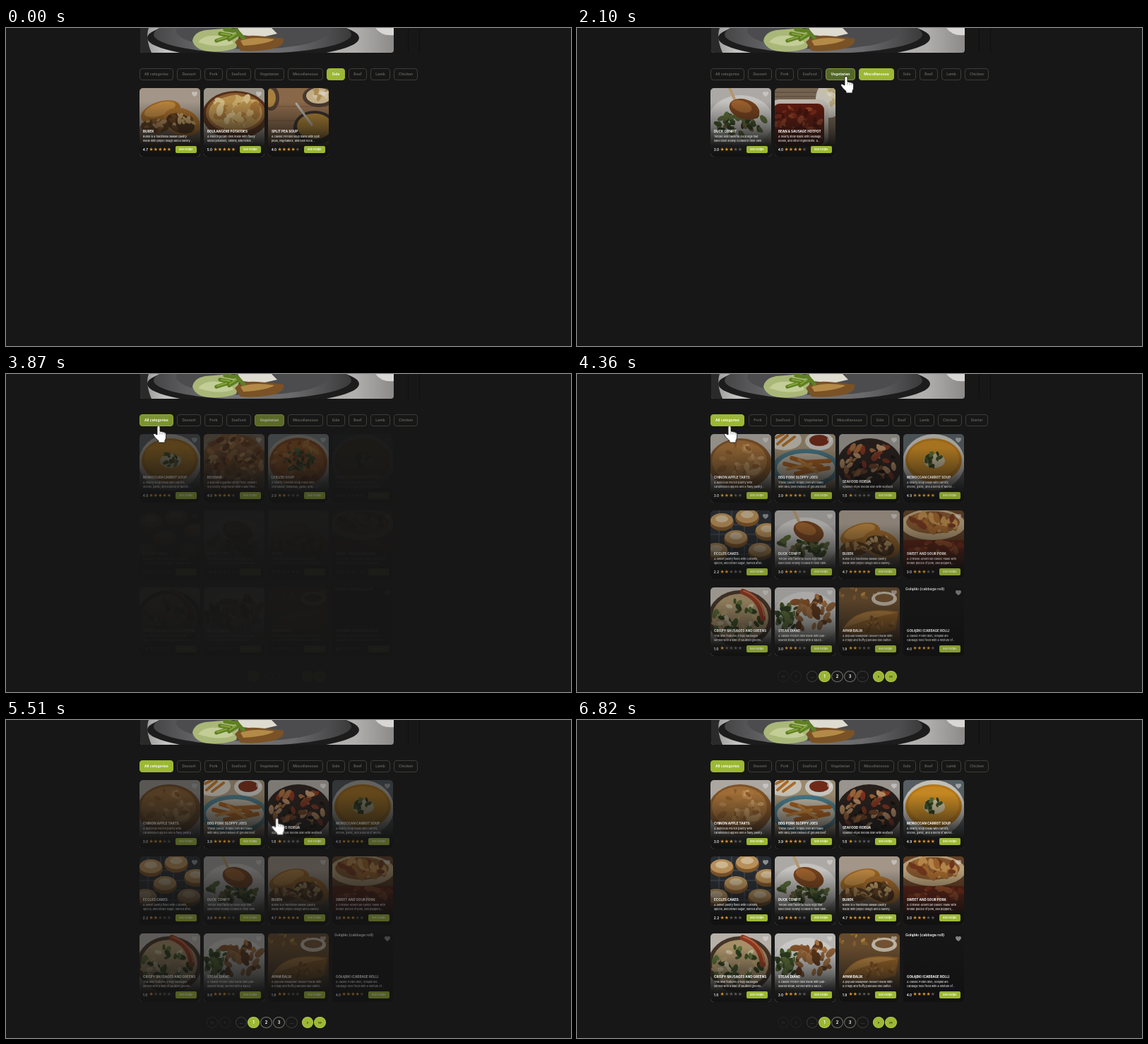
An HTML page that plays this animation: 800 by 450 pixels, repeating every 7.09 s.

```html
<!DOCTYPE html>
<html lang="en">
<head>
<meta charset="utf-8">
<title>Recipe categories</title>
<style>
:root { --bg: #171717; --green: #9cb834; --olive: #54672a; --line: #3d3d39; --mute: #64645e; }
html, body { margin: 0; width: 100%; height: 100%; overflow: hidden; background: var(--bg); }
#stage { position: relative; width: 800px; height: 450px; overflow: hidden; background: var(--bg); color: #fff; font-family: Inter, Roboto, sans-serif; }
#stage * { box-sizing: border-box; }
.hero { position: absolute; left: 190px; top: 0; border-radius: 0 0 4px 4px; }
.edge { position: absolute; left: 569px; top: 0; width: 17px; height: 35px; border: solid #0f0f0f; border-width: 0 1px; }

/* category bar */
.bar { position: absolute; left: 189px; top: 57px; width: 393.5px; height: 17px; overflow: hidden; }
.rest { position: absolute; left: 53px; top: 0; display: flex; gap: 5px; animation: shift 7090ms step-end infinite; }
.chip { flex: none; height: 17px; border: 1px solid var(--line); border-radius: 4px; color: var(--mute); font: 600 5.1px/15px Inter, Roboto, sans-serif; text-align: center; white-space: nowrap; animation: 7090ms ease-out infinite; }
.all { position: absolute; left: 0; z-index: 1; animation-name: all; }
.dessert { animation-name: dessert; }
.vegetarian { animation-name: vegetarian; }
.miscellaneous { animation-name: miscellaneous; }
.side { animation-name: side; }
@keyframes shift { 0%, 65.2% { transform: none; } 54.9% { transform: translateX(-38px); } }
@keyframes side {
  0%, 15.3% { background: var(--green); border-color: var(--green); color: #fff; }
  17.4%, 100% { background: var(--bg); border-color: var(--line); color: var(--mute); }
}
@keyframes miscellaneous {
  0%, 10.4%, 35.4%, 100% { background: var(--bg); border-color: var(--line); color: var(--mute); }
  12.4%, 15.3% { background: var(--olive); border-color: var(--green); color: #fff; }
  17.4%, 33.2% { background: var(--green); border-color: var(--green); color: #fff; }
}
@keyframes vegetarian {
  0%, 27.2%, 56%, 100% { background: var(--bg); border-color: var(--line); color: var(--mute); }
  29.3%, 33.2% { background: var(--olive); border-color: #84983a; color: #fff; }
  35.4%, 53.9% { background: var(--green); border-color: var(--green); color: #fff; }
}
@keyframes dessert {
  0%, 42.4%, 49.4%, 100% { background: var(--bg); border-color: var(--line); color: var(--mute); opacity: 1; }
  44.4%, 47.4% { background: var(--olive); border-color: #84983a; color: #fff; }
  54.89%, 65.2% { opacity: 1; }
  54.9%, 65.19% { opacity: 0; }
}
@keyframes all {
  0%, 47.4% { background: var(--bg); border-color: var(--line); color: var(--mute); }
  49.9%, 53.9% { background: var(--olive); border-color: #84983a; color: #fff; }
  55.7%, 100% { background: var(--green); border-color: var(--green); color: #fff; }
}

/* recipe cards */
.set { position: absolute; left: 189px; top: 85px; animation: 7090ms linear infinite; }
.set.s0 { animation-name: show-side; }
.set.s1 { animation-name: show-misc; }
.set.s2 { animation-name: show-veg; }
.set.s3, .pages { animation-name: show-all; }
@keyframes show-side { 0%, 15.3% { opacity: 1; } 18.5%, 100% { opacity: 0; } }
@keyframes show-misc { 0%, 15.8% { opacity: 0; } 22%, 33.9% { opacity: 1; } 36.3%, 100% { opacity: 0; } }
@keyframes show-veg { 0%, 34.6% { opacity: 0; } 44%, 53.9% { opacity: 1; } 55%, 100% { opacity: 0; } }
@keyframes show-all { 0%, 54.3% { opacity: 0; } 63%, 100% { opacity: 1; } }

.card { position: absolute; width: 86.4px; height: 97px; border-radius: 5px; overflow: hidden; background: #111; }
.card > svg { position: absolute; left: 0; top: 0; }
.card .shade { position: absolute; inset: 0; background: linear-gradient(rgba(17,17,17,.1) 20%, rgba(17,17,17,.55) 58%, rgba(17,17,17,.94) 84%, #111); }
.card .heart { left: 73.5px; top: 4.5px; opacity: .55; }
.card .alt { position: absolute; left: 3px; top: -1px; font: 600 5.2px/7px Inter, sans-serif; white-space: nowrap; }
.text { position: absolute; left: 5px; bottom: 19.3px; white-space: nowrap; }
.text b { display: block; font: 700 4.6px/8px Inter, sans-serif; text-transform: uppercase; }
.text p { margin: 0; font: 500 3.75px/6px Inter, sans-serif; color: #e2e2e2; }
.rate { position: absolute; left: 4.8px; top: 83px; font: 600 4.7px/9px Inter, sans-serif; }
.stars { position: absolute; left: 13.6px; top: 82.5px; color: #d9952b; font: 7px/9px "DejaVu Sans", sans-serif; white-space: nowrap; }
.stars i { color: #5b5b58; font-style: normal; }
.see { position: absolute; left: 51px; top: 82px; width: 29.5px; height: 10px; border-radius: 2px; background: var(--green); font: 600 3.8px/10px Inter, sans-serif; text-align: center; }

.s3 .card { animation: dim 7090ms ease-out infinite; }
.s3 .card:nth-child(1) { animation-name: hover1; }
.s3 .card:nth-child(2) { animation-name: hover2; }
.s3 .card:nth-child(3) { animation-name: hover3; }
.s3 .card:nth-child(4) { animation-name: hover4; }
@keyframes dim { 0%, 64.3% { opacity: 1; } 67.7%, 89.5% { opacity: .45; } 96.2%, 100% { opacity: 1; } }
@keyframes hover1 {
  0%, 64.3% { opacity: 1; filter: brightness(1); }
  66.5%, 70.2% { opacity: 1; filter: brightness(1.15); }
  73.3%, 89.5% { opacity: .45; filter: brightness(1); }
  96.2%, 100% { opacity: 1; filter: brightness(1); }
}
@keyframes hover2 {
  0%, 64.3% { opacity: 1; filter: brightness(1); }
  67.7%, 70.2% { opacity: .45; filter: brightness(1); }
  73%, 76.5% { opacity: 1; filter: brightness(1.15); }
  79.5%, 89.5% { opacity: .45; filter: brightness(1); }
  96.2%, 100% { opacity: 1; filter: brightness(1); }
}
@keyframes hover3 {
  0%, 64.3% { opacity: 1; filter: brightness(1); }
  67.7%, 76.8% { opacity: .45; filter: brightness(1); }
  79.5%, 82% { opacity: 1; filter: brightness(1.15); }
  85%, 89.5% { opacity: .45; filter: brightness(1); }
  96.2%, 100% { opacity: 1; filter: brightness(1); }
}
@keyframes hover4 {
  0%, 64.3% { opacity: 1; filter: brightness(1); }
  67.7%, 82.2% { opacity: .45; filter: brightness(1); }
  85%, 88.5% { opacity: 1; filter: brightness(1.15); }
  92%, 100% { opacity: 1; filter: brightness(1); }
}

/* pagination */
.pages { position: absolute; left: 0; top: 420px; animation-duration: 7090ms; animation-iteration-count: infinite; }
.pages span { position: absolute; width: 16.4px; height: 16px; margin-left: -8.2px; border: 1px solid #232323; border-radius: 50%; color: #3a3a3a; font: 700 5.6px/14px Inter, sans-serif; text-align: center; }
.pages .dots { border-color: #3a3a37; color: #777; }
.pages .num { border-color: #74746e; color: #fff; }
.pages .on { border-color: #b4cb50; background: var(--green); color: #fff; }
.pages .next { border-color: #b4cb50; background: var(--green); color: #14160c; }

.cursor { position: absolute; left: -8px; top: 0; animation: move 7090ms ease-in-out infinite, seen 7090ms step-end infinite; }
@keyframes seen { 0% { opacity: 0; } .98% { opacity: 1; } 95.1% { opacity: 0; } }
@keyframes move {
  0%, .99% { transform: translate(712px, 397px); animation-timing-function: ease-out; }
  10.4%, 24.7% { transform: translate(425px, 66px); }
  28.9%, 36.25% { transform: translate(381px, 68px); }
  42.1% { transform: translate(268px, 72px); }
  46.9% { transform: translate(266px, 72px); }
  49.9%, 63.3% { transform: translate(216px, 73px); animation-timing-function: ease-in; }
  66.3% { transform: translate(232px, 122px); animation-timing-function: linear; }
  70.1% { transform: translate(304px, 132px); animation-timing-function: linear; }
  74.9% { transform: translate(345px, 137px); animation-timing-function: linear; }
  80.4% { transform: translate(420px, 140px); animation-timing-function: ease-out; }
  84.6%, 86.2% { transform: translate(511px, 142px); animation-timing-function: ease-in; }
  88.5% { transform: translate(562px, 165px); animation-timing-function: linear; }
  95%, 100% { transform: translate(738px, 411px); }
}
</style>
</head>
<body>
<div id="stage">
  <svg class="hero" width="359" height="35">
    <defs>
      <linearGradient id="wall"><stop offset="0" stop-color="#8f8f8f"/><stop offset=".1" stop-color="#c4c4c3"/><stop offset=".85" stop-color="#b0afae"/><stop offset="1" stop-color="#8c8a89"/></linearGradient>
      <linearGradient id="plate"><stop offset="0" stop-color="#454546"/><stop offset=".35" stop-color="#77777a"/><stop offset=".7" stop-color="#6a6a6c"/><stop offset="1" stop-color="#3a3a3b"/></linearGradient>
    </defs>
    <rect width="359" height="35" fill="url(#wall)"/>
    <path d="M0 0H12Q7 14 16 35H0Z" fill="#2a2a2a"/>
    <ellipse cx="160" cy="14" rx="150" ry="29" fill="#1c1c1d"/>
    <ellipse cx="159" cy="9" rx="140" ry="27" fill="url(#plate)"/>
    <ellipse cx="159" cy="4" rx="108" ry="26" fill="#4c4c4e"/>
    <path d="M74 18Q76 6 92 3L128 0 140 10 136 28Q120 35 96 33 78 31 74 18Z" fill="#a9b878"/>
    <path d="M82 20Q90 9 110 11T132 22Q112 30 82 20Z" fill="#c3cd97"/>
    <path d="M138 0H186L194 8 172 13 144 10Z" fill="#dedbd0"/>
    <path d="M134 20Q142 9 166 11T203 15Q205 26 184 30T142 32Z" fill="#7a5225"/>
    <path d="M142 18Q160 11 190 16 180 23 146 25Z" fill="#b48a48"/>
    <g stroke="#5f7f23" stroke-width="5.5" stroke-linecap="round"><path d="M108 18l16-5M113 8l16 3M126 16l12-7M136 3l10 11M120 2l12 2"/></g>
    <g stroke="#86a53c" stroke-width="2" stroke-linecap="round"><path d="M109 17l13-4M115 8l12 2M127 14l9-6"/></g>
    <path d="M333 0H359V10Q342 12 333 0Z" fill="#d9d7d5"/>
  </svg>
  <div class="edge"></div>
  <div class="bar"><div class="chip all" style="width:48px">All categories</div><div class="rest"></div></div>
  <div class="pages"></div>
  <svg class="cursor" width="20" height="25">
    <path d="M6 13V2.4a2 2 0 0 1 4 0V8l6 1.3q2.6.6 2.6 3V16q0 3-1.6 5v3H8v-2.500Q3.500 18 1 14q-1-2 .6-2.600 1.500-.4 2.900 1.100Z" fill="#fff" stroke="#1c1c1c" stroke-width=".9"/>
    <path d="M10 8.500v4M13 9.500v3M16 10v3" stroke="#777" stroke-width=".7"/>
  </svg>
</div>
<script>
const $ = q => document.querySelector(q);

let seed = 7;
const rnd = () => (seed = (seed * 16807) % 2147483647) / 2147483647;

// Shapes for the food pictures
const o = (x, y, rx, ry, fill, turn = 0) =>
  `<ellipse cx="${x}" cy="${y}" rx="${rx}" ry="${ry}" fill="${fill}" transform="rotate(${turn} ${x} ${y})"/>`;
const box = (x, y, w, h, fill, r = 0) => `<rect x="${x}" y="${y}" width="${w}" height="${h}" rx="${r}" fill="${fill}"/>`;
const line = (d, stroke, w) => `<path d="${d}" fill="none" stroke="${stroke}" stroke-width="${w}" stroke-linecap="round"/>`;
const back = fill => box(0, 0, 87, 97, fill);
function bits(n, x, y, rx, ry, size, colors) {
  let out = '';
  for (let i = 0; i < n; i++) {
    const a = rnd() * 6.283, d = Math.sqrt(rnd()), s = size * (.6 + rnd() * .6);
    out += o((x + Math.cos(a) * d * rx).toFixed(1), (y + Math.sin(a) * d * ry).toFixed(1),
      s.toFixed(1), (s * .55).toFixed(1), colors[i % colors.length], Math.round(rnd() * 180));
  }
  return out;
}
const herbs = ['#3f5526', '#61763a', '#2e3f1d'];

const art = {
  tarts: () => back('#bdb8b0') + o(42, 42, 45, 36, '#8b5a2b') + o(41, 38, 39, 29, '#ad763a') +
    bits(34, 41, 37, 33, 24, 7, ['#c38d4f', '#98622d', '#d3a468', '#b27a3b']),
  joes: () => back('#a99679') + o(14, 8, 24, 15, '#d9d3c5') + line('M4 14L18 2M12 16L28 4M2 5L12 0', '#b9752a', 4) +
    o(63, 10, 20, 13, '#d9d8d2') + o(63, 9, 14, 8, '#7a2d18') + o(44, 48, 48, 27, '#4e8190') + o(44, 48, 41, 21, '#c9c0ae') +
    line('M14 42L46 50M24 34L66 46M30 56L76 48M40 40L78 38', '#b3641f', 6) + line('M18 50L52 42M34 36L60 54', '#d08b3a', 4),
  fideua: () => back('#a8a39c') + o(43, 44, 46, 38, '#2b211c') +
    bits(60, 43, 42, 39, 31, 6, ['#15110f', '#7b4526', '#a66b3d', '#26201e', '#8b3420', '#c39468']),
  carrot: () => back('#5d666b') + o(43, 40, 44, 40, '#d5d2ca') + o(43, 37, 40, 31, '#c98318') + o(43, 35, 36, 26, '#d89424') +
    o(44, 38, 15, 10, '#ddd0aa') + bits(18, 43, 36, 12, 11, 4, herbs),
  eccles: () => back('#2b3036') + line('M0 20H87M0 34H87M0 48H87M0 62H87M12 0V80M30 0V80M48 0V80M66 0V80', '#565e66', 1) +
    [[16, 14], [52, 8], [80, 28], [36, 38], [70, 56], [8, 56]].map(([x, y]) =>
      o(x, y + 3, 17, 12, '#8a5c2a') + o(x, y, 16, 10, '#c99c60') + o(x, y - 2, 9, 5, '#e0c9a0')).join(''),
  duck: () => back('#bdbab6') + o(43, 46, 46, 36, '#d8d6d2') + bits(46, 44, 50, 36, 17, 6, [...herbs, '#7c6a3c']) +
    line('M27 0L36 20', '#c6a478', 4) + o(48, 30, 22, 14, '#7d461e', 18) + o(44, 26, 15, 8, '#a8672f', 18),
  burek: () => back('#b3a596') + box(0, 54, 87, 43, '#806c5a') + o(30, 34, 29, 15, '#a76b25', -18) + o(29, 30, 23, 9, '#c98f43', -18) +
    o(60, 48, 27, 19, '#b0722c', 22) + o(58, 50, 21, 13, '#4f331b', 22) + bits(20, 58, 49, 19, 12, 5, ['#d2ab6b', '#73491f']) +
    o(22, 54, 20, 10, '#5e3c1d') + bits(12, 22, 53, 16, 8, 5, ['#c1935a', '#8a5a2a']),
  pork: () => back('#6a4427') + o(42, 20, 46, 22, '#c7ac82') + o(42, 17, 38, 16, '#8c5a2f') +
    bits(30, 42, 16, 35, 13, 7, ['#a86a2d', '#c6924f', '#79391d']) + box(0, 42, 87, 55, '#6b2414') + bits(18, 44, 54, 42, 10, 6, ['#8e3119', '#a8552a']),
  sausages: () => back('#c8c3ba') + o(42, 44, 46, 40, '#4a382a') + o(42, 43, 40, 34, '#b79d72') +
    bits(44, 38, 44, 34, 26, 6, [...herbs, '#c9ab72', '#d9cba4']) + line('M46 6Q72 16 74 44', '#9a3b20', 8) + line('M47 5Q73 14 76 40', '#c46a45', 2),
  steak: () => back('#c9c8c5') + o(44, 44, 47, 38, '#deddda') + bits(40, 52, 36, 30, 24, 7, ['#8b562a', '#b27a45', '#633a1c', '#9c6a3c']) +
    bits(24, 17, 40, 15, 20, 6, herbs),
  apam: () => back('#6f5130') + bits(12, 30, 8, 34, 8, 4, ['#b98a3f', '#8b6330']) + o(64, 16, 18, 10, '#cfc4b2') + o(64, 15, 13, 6, '#7b5835') +
    '<path d="M4 62Q20 24 84 34L80 60Q40 72 4 62Z" fill="#a56b2a"/><path d="M6 58Q26 26 82 36 46 42 6 58Z" fill="#c48b43"/>' +
    bits(16, 46, 52, 32, 8, 4, ['#8a5722', '#b87e39']),
  rolls: () => back('#161616'),
  potatoes: () => back('#aba497') + o(45, 38, 47, 34, '#5d331b') + o(45, 35, 42, 28, '#9b6530') + o(45, 35, 38, 24, '#c79c55') +
    bits(44, 45, 34, 34, 20, 8, ['#d9b873', '#b07c3a', '#e2c98e', '#c69a52']),
  pea: () => back('#96714f') + line('M0 26H87M0 46H87', '#7c5a3c', 1) + o(72, 12, 23, 15, '#4c3c30') + o(72, 11, 18, 11, '#d6bf94') +
    bits(14, 72, 10, 14, 8, 5, ['#e2d1ac', '#bd9858']) + o(66, 56, 30, 24, '#382e27') + o(66, 54, 25, 18, '#b98a35') +
    line('M40 22L62 52', '#bdb8b0', 3) + o(4, 14, 12, 18, '#544031') + o(2, 14, 9, 13, '#b98d43'),
  hotpot: () => back('#7f6c57') + line('M0 6H60M0 12H60', '#5e4b3a', 1) + o(78, 16, 20, 26, '#d5d2c6') + bits(14, 78, 14, 12, 18, 5, ['#ded3b0', '#c5b585']) +
    box(-6, 16, 82, 66, '#cdc7bd', 12) + box(-2, 22, 72, 60, '#651a0e', 9) + bits(40, 34, 46, 33, 22, 5, ['#8a2b17', '#4d130b', '#a04524']),
  koshari: () => back('#8b7a66') + o(43, 44, 48, 44, '#8a5a2b') +
    bits(90, 43, 38, 43, 38, 6, ['#b9793b', '#d4a060', '#7c4320', '#9f5a25', '#5f2f17']),
  leblebi: () => back('#8d9ba0') + o(43, 42, 46, 41, '#cbc4b8') + o(43, 40, 41, 35, '#a8541c') + o(43, 36, 36, 27, '#bf6a25') +
    bits(24, 43, 38, 36, 28, 5, ['#d18a3f', '#96401a']) + bits(36, 42, 36, 22, 17, 4, herbs)
};

// title, text, rating
const recipes = {
  tarts: ['Chinon apple tarts', 'A delicious French pastry with|caramelized apples and a flaky pastry...', 3.0],
  joes: ['BBQ pork sloppy joes', 'These classic sloppy joes are made|with BBQ pork instead of ground beef...', 3.9],
  fideua: ['Seafood fideuà', 'Spanish-style noodle dish with seafood', 1.0],
  carrot: ['Moroccan carrot soup', 'A hearty soup made with carrots,|onions, garlic, and a blend of Moroc...', 4.9],
  eccles: ['Eccles cakes', 'A sweet pastry filled with currants,|spices, and brown sugar, named after...', 2.2],
  duck: ['Duck confit', 'Tender and flavorful duck legs that|have been slowly cooked in their own...', 3.0],
  burek: ['Burek', 'Burek is a traditional Balkan pastry|made with phyllo dough and a savory...', 4.7],
  pork: ['Sweet and sour pork', 'A Chinese-American classic made with|tender pieces of pork, bell peppers,...', 3.0],
  sausages: ['Crispy sausages and greens', 'This dish features crispy sausages|served with a side of sautéed greens...', 1.0],
  steak: ['Steak Diane', 'A classic French dish made with pan-|seared steak, served with a sauce...', 3.0],
  apam: ['Apam balik', 'A popular Malaysian dessert made with|a crispy and fluffy pancake-like batter...', 1.9],
  rolls: ['Gołąbki (cabbage roll)', 'A classic Polish dish, Gołąbki are|cabbage rolls filled with a mixture of...', 4.0],
  potatoes: ['Boulangère potatoes', 'A French potato dish made with finely|sliced potatoes, onions, and herbs...', 5.0],
  pea: ['Split pea soup', 'A classic Finnish soup made with split|peas, vegetables, and ham hock...', 4.0],
  hotpot: ['Bean &amp; sausage hotpot', 'A hearty stew made with sausage,|beans, and other ingredients. A...', 4.0],
  koshari: ['Koshari', 'A popular Egyptian street food, koshari|is a hearty vegetarian dish made from...', 4.0],
  leblebi: ['Leblebi soup', 'A hearty Tunisian soup made with|chickpeas, tomatoes, garlic, and...', 2.0]
};

const heart = `<svg class="heart" width="8" height="8"><path fill="#ddd" d="M4 7.2C1 5 0 3.600 0 2.200 0 .9 1 0 2.100 0 2.900 0 3.600.4 4 1.100 4.400.4 5.100 0 5.900 0 7 0 8 .9 8 2.200 8 3.600 7 5 4 7.200Z"/></svg>`;

function card(key, i) {
  const [title, text, rate] = recipes[key], full = Math.round(rate);
  return `<div class="card" style="left:${i % 4 * 91}px;top:${(i >> 2) * 108.4}px">
    <svg width="87" height="97">${art[key]()}</svg><div class="shade"></div>${heart}
    ${key === 'rolls' ? `<div class="alt">${title}</div>` : ''}
    <div class="text"><b>${title}</b><p>${text.replace('|', '<br>')}</p></div>
    <div class="rate">${rate.toFixed(1)}</div>
    <div class="stars">${'★'.repeat(full)}<i>${'★'.repeat(5 - full)}</i></div>
    <div class="see">See recipe</div></div>`;
}

const sets = ['burek potatoes pea', 'duck hotpot', 'carrot koshari leblebi',
  'tarts joes fideua carrot eccles duck burek pork sausages steak apam rolls'];
$('.pages').insertAdjacentHTML('beforebegin', sets.map((keys, n) =>
  `<div class="set s${n}">${keys.split(' ').map(card).join('')}</div>`).join(''));

const chips = { Dessert: 34, Pork: 26, Seafood: 35, Vegetarian: 42, Miscellaneous: 50, Side: 26, Beef: 26, Lamb: 28, Chicken: 34, Starter: 32 };
$('.rest').innerHTML = Object.entries(chips).map(([name, w]) =>
  `<div class="chip ${name.toLowerCase()}" style="width:${w}px">${name}</div>`).join('');

const pages = [[292, '‹‹', ''], [310, '‹', ''], [333, '...', 'dots'], [350.5, '1', 'on'], [368.5, '2', 'num'],
  [386.5, '3', 'num'], [404.5, '...', 'dots'], [427, '›', 'next'], [444.5, '››', 'next']];
$('.pages').innerHTML = pages.map(([x, label, kind]) => `<span class="${kind}" style="left:${x}px">${label}</span>`).join('');
</script>
</body>
</html>
```
